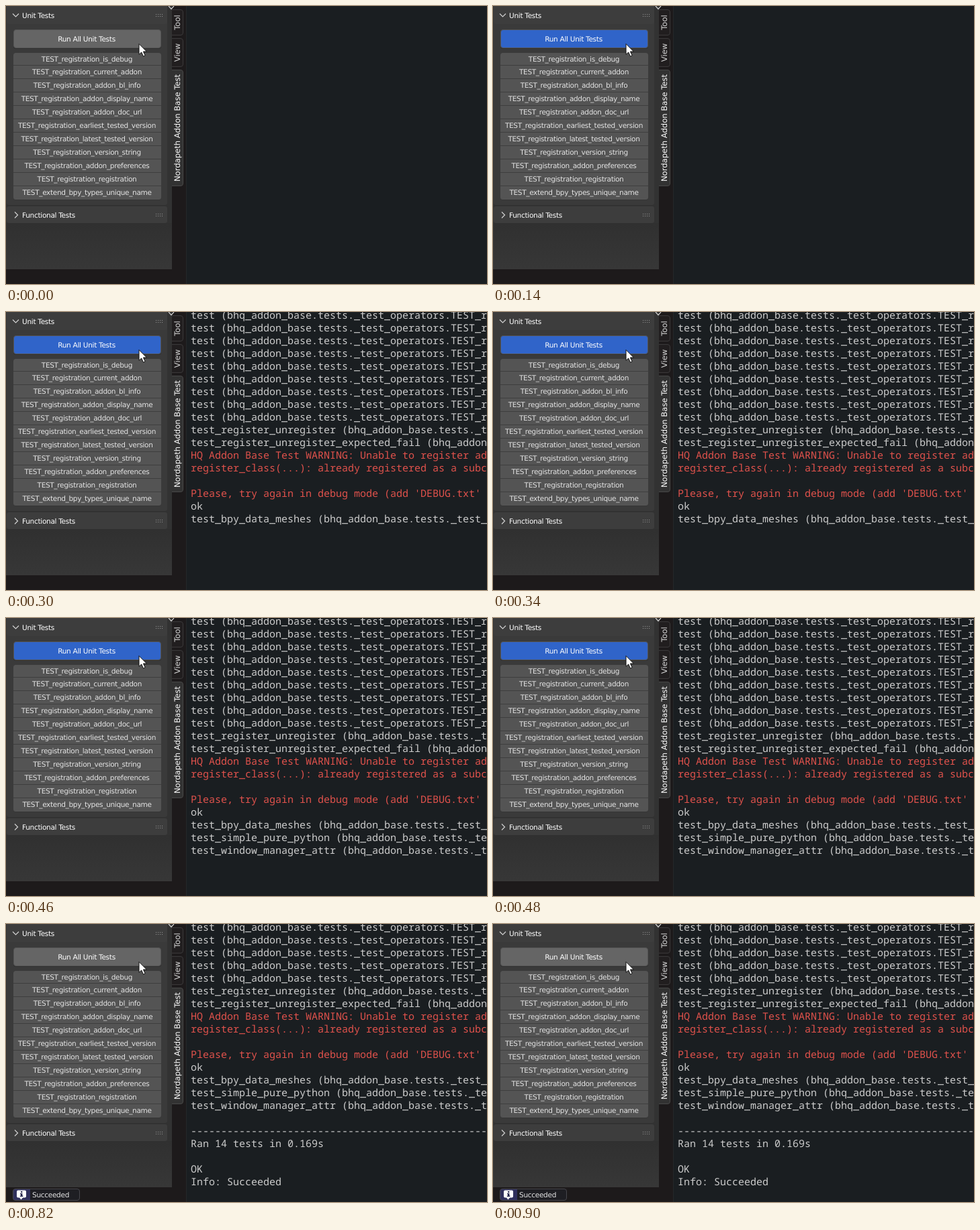
These frames come from a looping animation (716x415 px, 1200 ms). An HTML page:

```html
<!DOCTYPE html>
<html lang="en">
<head>
<meta charset="utf-8">
<title>Unit test run</title>
<style>
  html, body { margin: 0; width: 100%; height: 100%; overflow: hidden; background: #1a1e21; }
  svg { display: block; width: 716px; height: 415px; }
  text { white-space: pre; text-rendering: geometricPrecision; }
  .ui { font: 10.5px "DejaVu Sans", sans-serif; letter-spacing: -.28px; fill: #e4e4e4; }
  .mid { text-anchor: middle; }
  .bright { fill: #fff; }
  .item { letter-spacing: -.33px; }
  .tab { font: 11.6px "DejaVu Sans", sans-serif; text-anchor: middle; fill: #d6d6d6; }
  .log { font: 15px "Noto Sans Mono", "DejaVu Sans Mono", monospace; fill: #cccccc; }
  .log .error { fill: #e0524c; }
  .line { fill: none; stroke: #d0d0d0; stroke-width: 1.2; }
</style>
</head>
<body>
<svg id="stage" viewBox="0 0 716 415">
  <defs>
    <linearGradient id="shade" x1="0" y1="0" x2="0" y2="1">
      <stop offset="0" stop-color="#303030"/>
      <stop offset="1" stop-color="#373737"/>
    </linearGradient>
    <clipPath id="view"><rect x="269" width="447" height="415"/></clipPath>
  </defs>

  <rect width="269" height="415" fill="#1d1a1b"/>
  <rect width="247" height="393" fill="#323232"/>
  <rect y="324" width="247" height="69" fill="url(#shade)"/>
  <rect x="1" y="-4" width="239" height="301" rx="3" fill="#3a3a3a"/>
  <rect x="1" y="-4" width="239" height="31" rx="3" fill="#3d3d3d"/>
  <rect x="1" y="299" width="239" height="25" rx="3" fill="#3d3d3d"/>
  <path class="line" d="M10 11.5l4.5 4.5l4.5-4.5M13 307.5l4.5 4.5l-4.5 4.5"/>
  <g id="grips" fill="#999"></g>
  <text class="ui bright" x="24" y="18">Unit Tests</text>
  <text class="ui bright" x="24" y="316">Functional Tests</text>

  <rect x="11" y="36" width="220" height="28" rx="3.5" fill="#303030"/>
  <rect id="run" x="11.5" y="35.5" width="219" height="27" rx="3.5" stroke="#545454"/>
  <text class="ui mid bright" x="120" y="53">Run All Unit Tests</text>

  <rect x="11" y="70" width="220" height="220" rx="3.5" fill="#353535"/>
  <rect x="11" y="70" width="220" height="219" rx="3.5" fill="#545454"/>
  <g id="tests"></g>

  <g id="tabs"></g>
  <path class="line" d="M242 0l4 4.5l4-4.5"/>

  <rect x="268" width="448" height="415" fill="#1a1e21"/>
  <rect x="268" width="1" height="415" fill="#24272a"/>
  <g clip-path="url(#view)"><g id="log" class="log"></g></g>

  <g id="report">
    <rect x="10.5" y="395.5" width="99" height="17" rx="3.5" fill="#1e1e23"/>
    <path d="M36 395.5H14a3.5 3.5 0 0 0-3.5 3.5v10a3.5 3.5 0 0 0 3.5 3.5h22z" fill="#30305c"/>
    <rect x="10.5" y="395.5" width="99" height="17" rx="3.5" fill="none" stroke="#47474c"/>
    <path d="M18 397.5h10q2 0 2 2v7q0 2-2 2h-3l-2.5 3l-2.5-3h-2q-2 0-2-2v-7q0-2 2-2z" fill="#fff"/>
    <path d="M22 399h2.4v2h-2.4zM21 402h3.4v3.6h1v1.4h-4.6v-1.4h1.2v-2.2h-1z" fill="#25254d"/>
    <text class="ui" x="39" y="408">Succeeded</text>
  </g>

  <path d="M198 56.5V72.3l3.7-3.3l2.7 6.1l2.7-1.2l-2.7-5.9h5z" fill="#fff" stroke="#111" stroke-width="1"/>
</svg>
<script>
const LOOP = 1200, ROW = 19;
const PRESS = 140, DONE = 560;
const $ = id => document.getElementById(id);

function add(parent, tag, attrs, text) {
  const el = document.createElementNS("http://www.w3.org/2000/svg", tag);
  for (const key in attrs) el.setAttribute(key, attrs[key]);
  if (text !== undefined) el.textContent = text;
  return parent.appendChild(el);
}

for (const y of [12, 310])
  for (let i = 0; i < 8; i++)
    add($("grips"), "rect", { x: 223 + (i % 4) * 3, y: y + (i >> 2) * 3, width: 1, height: 1 });

const names = ["is_debug", "current_addon", "addon_bl_info", "addon_display_name", "addon_doc_url",
  "earliest_tested_version", "latest_tested_version", "version_string", "addon_preferences", "registration"]
  .map(name => "TEST_registration_" + name);
names.push("TEST_extend_bpy_types_unique_name");
names.forEach((name, i) => {
  if (i) add($("tests"), "rect", { x: 11, y: 68 + i * 20, width: 220, height: 1, fill: "#3e3e3e" });
  add($("tests"), "text", { class: "ui mid item", x: 120.5, y: i ? 82 + i * 20 : 83 }, name);
});

function addTab(label, top, bottom, active) {
  add($("tabs"), "path", {
    d: `M247 ${top}.5H260q3.5 0 3.5 3.5V${bottom - 4}q0 3.5-3.5 3.5H247`,
    fill: active ? "#323232" : "#211e1f", stroke: active ? "#484848" : "#3b393a"
  });
  const text = add($("tabs"), "text",
    { class: "tab", transform: `translate(259 ${(top + bottom) / 2}) rotate(-90)` }, label);
  if (active) text.style.fill = "#fff";
}
addTab("Tool", 5, 44);
addTab("View", 48, 91);
addTab("Nordapeth Addon Base Test", 95, 269, true);

const path = "(bhq_addon_base.tests._test_";
const lines = [
  ...Array(9).fill(`test ${path}operators.TEST_r`),
  `test_register_unregister ${path}`,
  `test_register_unregister_expected_fail ${path}`,
  "!HQ Addon Base Test WARNING: Unable to register ad",
  "!register_class(...): already registered as a subc",
  "",
  "!Please, try again in debug mode (add 'DEBUG.txt' ",
  "ok",
  `test_bpy_data_meshes ${path}`,
  `test_simple_pure_python ${path}`,
  `test_window_manager_attr ${path}`,
  "",
  "-".repeat(70),
  "Ran 14 tests in 0.169s",
  "",
  "OK",
  "Info: Succeeded"
];
const rows = lines.map((line, i) => {
  const error = line[0] === "!";
  return add($("log"), "text", { x: 275, y: 10 + i * ROW, class: error ? "error" : "" },
    error ? line.slice(1) : line);
});

// Each step: start time, number of printed lines
const steps = [[0, 0], [280, 1], [300, 17], [380, 18], [440, 19], [DONE, lines.length]];

function draw(t) {
  const busy = t >= PRESS && t < DONE, done = t >= DONE;
  const count = steps.filter(step => t >= step[0]).pop()[1];
  $("run").setAttribute("fill", busy ? "#3064c9" : "#656565");
  rows.forEach((row, i) => row.setAttribute("visibility", i < count ? "visible" : "hidden"));
  $("log").setAttribute("transform", `translate(0 ${done ? -4 * ROW : 0})`);
  $("report").setAttribute("visibility", done ? "visible" : "hidden");
}

const start = performance.now();
function tick() {
  draw((performance.now() - start) % LOOP);
  requestAnimationFrame(tick);
}
draw(0);
requestAnimationFrame(tick);
</script>
</body>
</html>
```
